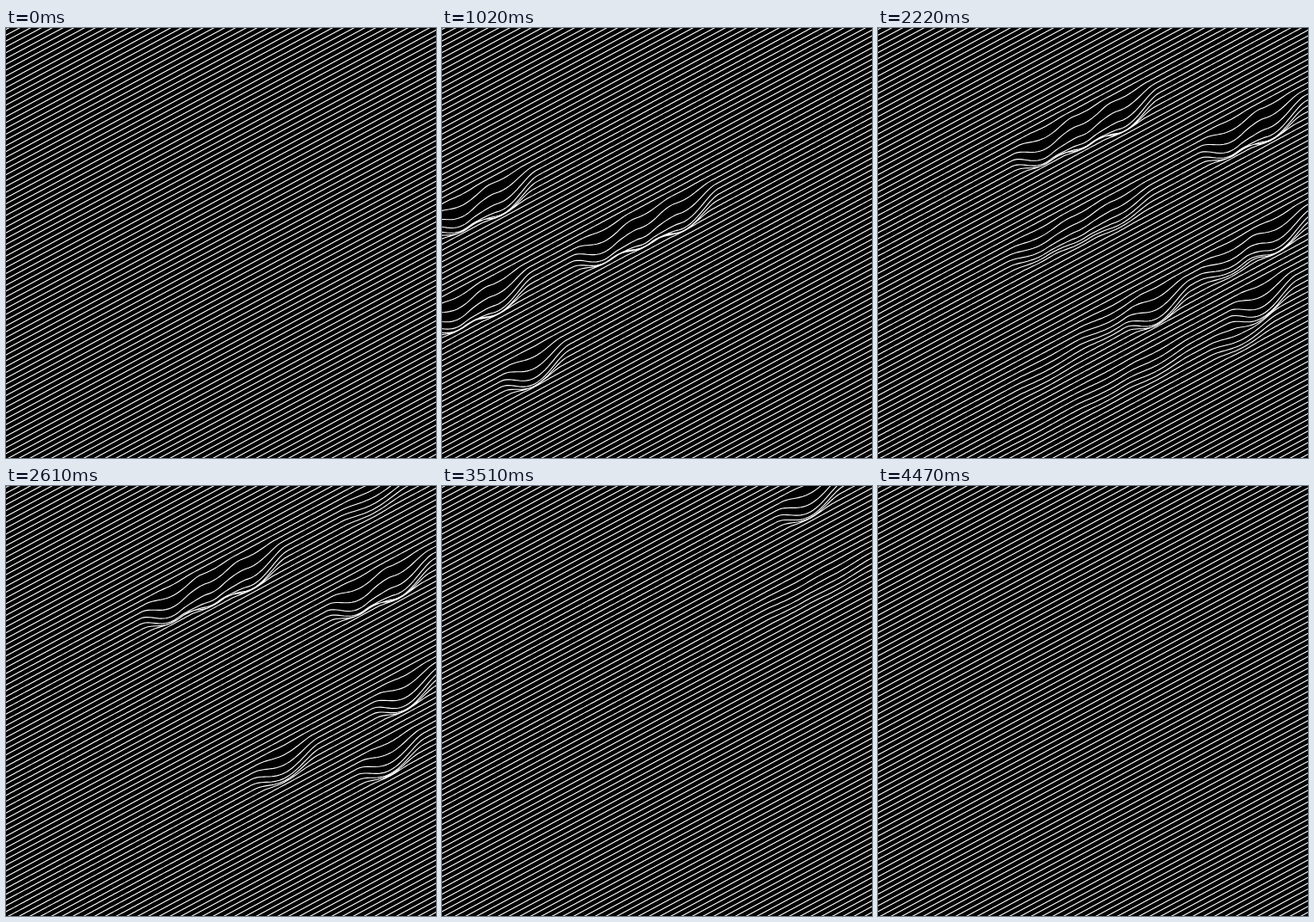
An HTML page with a canvas that plays this animation: 500 px wide and 500 px high, repeating every 4500 ms.

```html
<!DOCTYPE html>
<html lang="en">
<head>
<meta charset="utf-8">
<title>Rippling lines</title>
<style>
  html, body { margin: 0; width: 100%; height: 100%; overflow: hidden; background: #000; }
  canvas { display: block; }
</style>
</head>
<body>
<canvas width="500" height="500"></canvas>
<script>
const SIZE = 500, LOOP = 4500;
const SLOPE = 0.539, GAP = 6.757, OFFSET = 1.7;
const RADIUS_X = 40, RADIUS_Y = 26, DEPTH = 18;
const RISE = 220, FALL = 750;

// Dents appear in four waves; each entry is x, y and how many dents follow in a row.
const waves = [
  [[25, 213, 2], [190, 250, 3], [20, 328, 2], [108, 393]],
  [[195, 135, 3], [412, 267], [272, 339], [425, 353], [198, 398],
   [325, 390], [268, 416], [42, 467], [183, 467]],
  [[412, 126, 2], [325, 322], [447, 314], [465, 238]],
  [[428, 15]],
];

const dents = waves.flatMap((wave, i) => wave.flatMap(([x, y, count = 1]) => {
  const start = 600 + 570 * i + x / 2;
  const end = start + 1600 - 1.2 * y + 300 * (count - 1);
  return Array.from({ length: count }, (_, n) => {
    const px = x + 46 * n, py = y - 19 * n;
    return { x: px, level: py + SLOPE * px, start, end };
  });
}));

const ctx = document.querySelector("canvas").getContext("2d");

function smooth(v) {
  const k = Math.min(1, Math.max(0, v));
  return k * k * (3 - 2 * k);
}

function strength({ start, end }, t) {
  return DEPTH * smooth((t - start) / RISE) * smooth((end - t) / FALL);
}

function sag(x, level, active) {
  let sum = 0;
  for (const d of active) {
    const r2 = ((x - d.x) / RADIUS_X) ** 2 + ((level - d.level) / RADIUS_Y) ** 2;
    if (r2 < 1) sum += d.push * (1 - r2) ** 2;
  }
  return sum;
}

function draw(t) {
  const active = dents
    .map(d => ({ ...d, push: strength(d, t) }))
    .filter(d => d.push > 0);
  ctx.fillStyle = "#000";
  ctx.fillRect(0, 0, SIZE, SIZE);
  ctx.strokeStyle = "#fff";
  ctx.lineWidth = 1.1;
  ctx.beginPath();
  for (let level = OFFSET - 5 * GAP; level < SIZE * (1 + SLOPE) + GAP; level += GAP) {
    const near = active.filter(d => Math.abs(level - d.level) < RADIUS_Y);
    const step = near.length ? 3 : SIZE + 6;
    for (let x = -3; x <= SIZE + 3; x += step) {
      const y = level - SLOPE * x + sag(x, level, near);
      if (x < 0) ctx.moveTo(x, y);
      else ctx.lineTo(x, y);
    }
  }
  ctx.stroke();
}

const origin = performance.now();
function tick() {
  draw((performance.now() - origin) % LOOP);
  requestAnimationFrame(tick);
}
tick();
</script>
</body>
</html>
```
